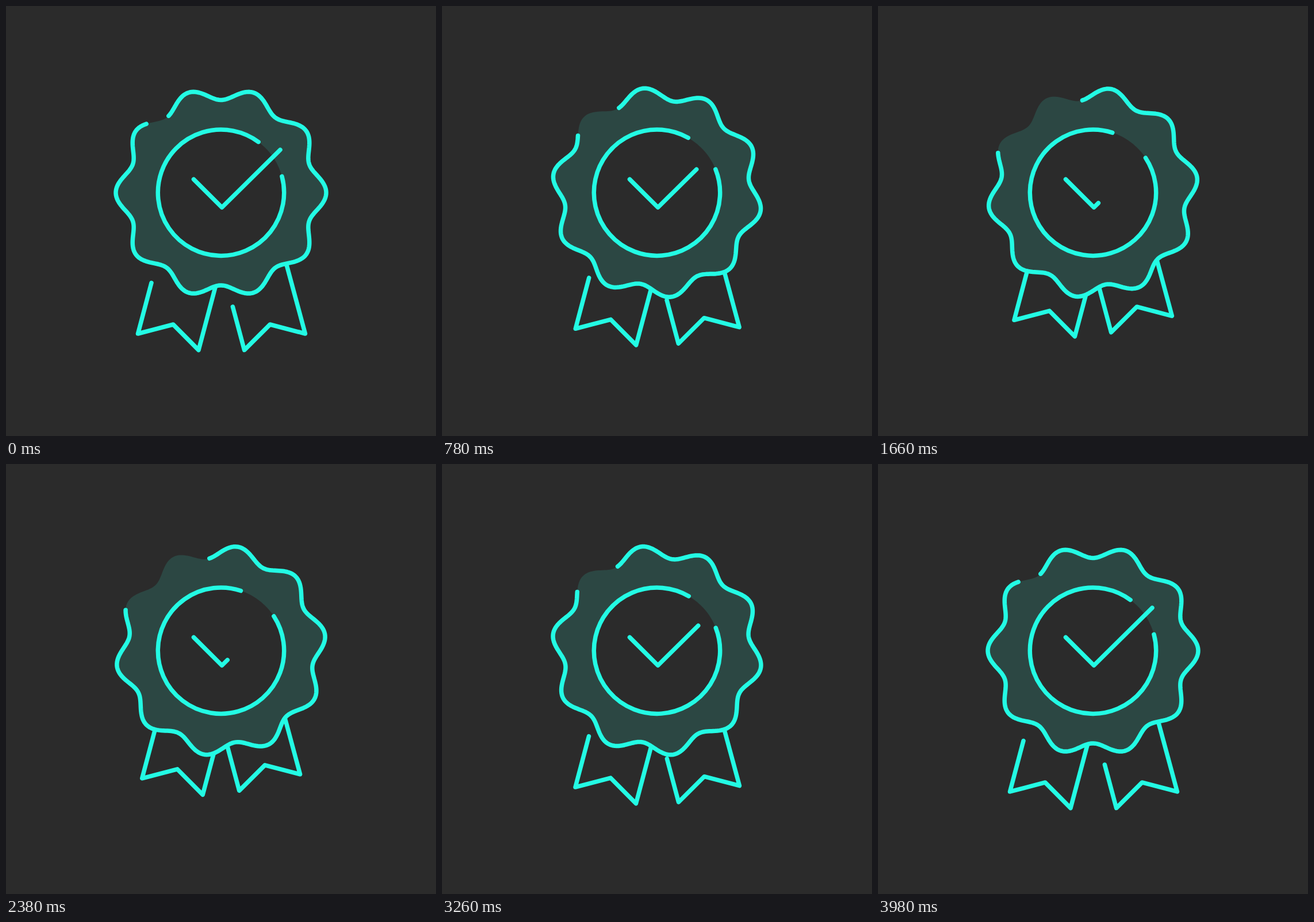
These frames come from a looping animation (748 px wide and 748 px high, 4000 ms). An HTML page:

```html
<!DOCTYPE html>
<html lang="en">
<head>
<meta charset="utf-8">
<title>Award badge</title>
<style>
  html, body { margin: 0; width: 100%; height: 100%; overflow: hidden; background: #2b2b2b; }
  svg { display: block; width: 100%; height: 100%; }
  .line { fill: none; stroke: #23fbe4; stroke-width: 7.5; stroke-linecap: round; stroke-linejoin: round; }
</style>
</head>
<body>
<svg viewBox="0 0 748 748">
  <path id="left" class="line" d="M253 481.5 L229.5 570 L290.8 554 L335 598.5 L369.2 470"/>
  <path id="right" class="line" d="M394.4 523 L414.6 598.5 L459.3 554 L520.5 570 L485.3 440"/>
  <g transform="translate(374 324.7)">
    <g id="badge">
      <path id="fill" fill="#2c4743"/>
      <path id="edge" class="line"/>
    </g>
    <circle r="109.7" fill="#2b2b2b"/>
    <path id="ring" class="line"/>
  </g>
  <path id="check" class="line"/>
</svg>
<script>
const LOOP = 4000;
const $ = id => document.getElementById(id);
const rad = deg => deg * Math.PI / 180;

// Angles run clockwise from the top.
const polar = (r, deg) =>
  `${(r * Math.sin(rad(deg))).toFixed(2)} ${(-r * Math.cos(rad(deg))).toFixed(2)}`;

// Ten-lobed outline
const START = -34.3;
const outline = [];
for (let a = 0; a <= 360; a++) {
  const deg = START + a;
  outline.push(polar(172.1 - 10.9 * Math.cos(rad(10 * deg)), deg));
}
const d = 'M' + outline.join('L');
$('fill').setAttribute('d', d + 'Z');
$('edge').setAttribute('d', d);
const edgeLength = $('edge').getTotalLength();

$('ring').setAttribute('d',
  `M${polar(109.7, 75)} A109.7 109.7 0 1 1 ${polar(109.7, 36.4)}`);

const smooth = x => x * x * (3 - 2 * x);
const move = (id, x, y) => $(id).setAttribute('transform', `translate(${x} ${y})`);
const turn = (id, deg) => $(id).setAttribute('transform', `rotate(${deg})`);

function draw(time) {
  const x = (time % LOOP) / (LOOP / 2);
  const p = smooth(x < 1 ? x : 2 - x);

  move('left', 8 * p, -25.6 * p);
  move('right', -9.8 * p, -33.4 * p);
  turn('badge', 30 * p);
  turn('ring', -20 * p);

  const gap = 41.7 + 170 * p;
  $('edge').setAttribute('stroke-dasharray', `${edgeLength - gap} ${edgeLength}`);

  $('check').setAttribute('d',
    `M326.5 301.5 L375.6 350.4 L${477 - 101.4 * p} ${250.2 + 100.2 * p}`);
}

const begin = performance.now();
function tick() {
  draw(performance.now() - begin);
  requestAnimationFrame(tick);
}
draw(0);
requestAnimationFrame(tick);
</script>
</body>
</html>
```
